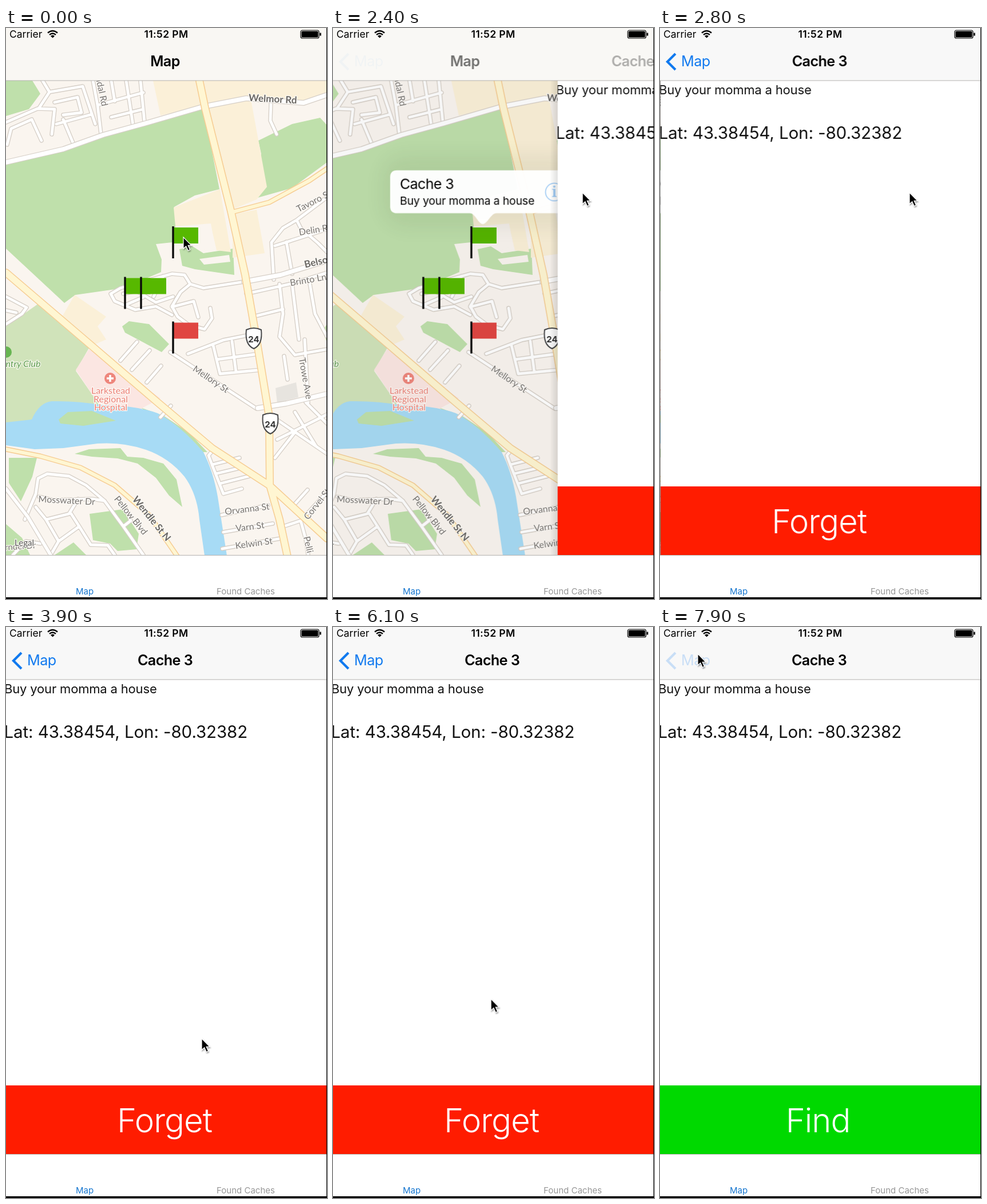
An HTML page for the animation above (8 s loop, 561x999 px).

```html
<!DOCTYPE html>
<html lang="en">
<head>
<meta charset="utf-8">
<title>Cache map</title>
<style>
html, body { margin: 0; width: 100%; height: 100%; overflow: hidden; background: #000; }
svg { display: block; width: 561px; height: 999px; font-family: Inter, Roboto, sans-serif; }
text { white-space: pre; }
.mid { text-anchor: middle; }

/* map */
.park { fill: #bfe0ab; }
.sand { fill: #fbf0d8; }
.water { fill: #a7dbf5; }
.land { fill: #faf5ef; }
.line { fill: none; stroke-linejoin: round; stroke-linecap: round; }
.case { stroke: #d6cfc7; }
.top { stroke: #fff; }
.hwcase { stroke: #f6cc92; }
.hwtop { stroke: #fff6d2; }
.label { font: 16px Lato, "Open Sans", sans-serif; fill: #777471; stroke: #fdfaf6; stroke-width: 2.5px; paint-order: stroke; text-anchor: middle; }
.main { font-weight: 700; fill: #6a6865; }
.poi { fill: #ec7f75; }
.club { fill: #579a48; font-style: italic; }

/* screens */
.title { font-size: 25.2px; font-weight: 600; letter-spacing: -.6px; }
.bar { font-size: 17.5px; }
.tab { font-size: 15px; }
.action { font-size: 58px; font-weight: 350; letter-spacing: -1px; fill: #fff; }

/* motion */
.slide, .fade, .anim, .leave, .enter { animation: 8s linear infinite; }
.slide { animation-name: slide; }
.fade { animation-name: fade; }
.leave { animation-name: slide, leave; }
.enter { animation-name: slide, fade; }
.hard { animation-timing-function: step-end; }
@keyframes slide {
  0%, 28.75% { transform: translateX(var(--from, 0px)); animation-timing-function: linear(0, .294, .785, .948, .989, .998, 1); }
  36.25%, 100% { transform: translateX(var(--to, 0px)); }
}
@keyframes fade {
  0%, 28.75% { opacity: 0; animation-timing-function: linear(0, .294, .785, .948, .989, .998, 1); }
  36.25%, 100% { opacity: var(--show, 1); }
}
@keyframes leave { 0%, 28.75% { opacity: 1; } 30% { opacity: .55; } 31.5%, 100% { opacity: 0; } }
@keyframes back {
  0%, 28.75% { opacity: 0; }
  30% { opacity: .03; }
  32.5% { opacity: .8; }
  35%, 96.25% { opacity: 1; }
  97.5%, 100% { opacity: .2; }
}
@keyframes pop {
  0%, 6.25% { opacity: 0; transform: scale(.3); }
  8.75% { opacity: 1; transform: scale(1.05); }
  10%, 100% { opacity: 1; transform: none; }
}
@keyframes press { 0%, 27.5% { opacity: 1; } 28.75%, 100% { opacity: .4; } }
@keyframes paint { 0% { fill: #ff1c00; } 86.25%, 100% { fill: #00d900; } }
@keyframes before { 0% { opacity: 1; } 86.25%, 100% { opacity: 0; } }
@keyframes after { 0% { opacity: 0; } 86.25%, 100% { opacity: 1; } }
@keyframes point {
  0%, 11.25% { transform: translate(310px, 366px); animation-timing-function: ease-in-out; }
  18.75%, 25% { transform: translate(430px, 292px); }
  27.5%, 45% { transform: translate(436px, 288px); }
  48.75%, 71.25% { transform: translate(342px, 720px); animation-timing-function: ease-in-out; }
  76.25% { transform: translate(276px, 650px); }
  80%, 91.25% { transform: translate(277px, 860px); animation-timing-function: ease-in-out; }
  96.25%, 100% { transform: translate(66px, 47px); }
}
#callout { animation-name: pop; transform-origin: 312px 343px; }
#info { animation-name: press; }
#back { animation-name: back; }
#button { animation-name: paint; }
#forget { animation-name: before; }
#find { animation-name: after; }
#cursor { animation-name: point; }
</style>
</head>
<body>
<svg viewBox="0 0 561 999" xmlns="http://www.w3.org/2000/svg">
<defs>
  <clipPath id="page"><rect y="92" width="560" height="831"/></clipPath>
  <clipPath id="screen"><rect width="560" height="996"/></clipPath>
  <filter id="soft" x="-30%" y="-60%" width="160%" height="220%"><feGaussianBlur stdDeviation="16"/></filter>
  <filter id="drop" x="-50%" y="-50%" width="200%" height="200%"><feDropShadow dx="1" dy="2" stdDeviation="1.2" flood-opacity=".4"/></filter>
  <linearGradient id="edge"><stop stop-opacity="0"/><stop offset="1" stop-opacity=".4"/></linearGradient>

  <path id="north" d="M0 165 55 141 85 142 80 186M2 204 9 176 45 160 62 197M64 92 76 112 57 141M76 112 134 102 150 150 156 168M85 130 125 121 132 148 100 152M88 168 150 151M118 203 100 160M152 92 160 135 166 185M184 92 190 128M210 92 222 170M235 92 242 164M160 135 240 113M184 156 236 143M463 132 462 162 473 186"/>
  <path id="east" d="M468 440 464 375 484 350 508 336 515 350 545 376 561 392M470 381 561 352M508 336 561 296M490 374 500 430M420 465 500 447 561 428M478 448 484 500 478 540 505 572 561 562M432 505 484 492M500 448 512 545M530 442 540 500 561 540M522 545 528 655M486 574 492 615"/>
  <path id="centre" d="M183 465 200 455 290 430 312 432 322 448 345 455 415 444M183 465 190 478 226 493 262 487 290 502M205 465 228 460 262 480 292 470M322 448 305 462 290 487 300 505 320 520 347 527 360 508 357 490M275 434 258 470M210 484 240 471M290 488 328 478 336 506M287 567 438 666M318 570 380 546 436 535M362 555 374 605 446 598M395 548 402 602M368 580 442 570M200 582 229 549M220 598 251 564M246 620 271 591M270 681 288 661"/>
  <path id="south" d="M474 720 561 676M476 687 561 745M505 672 542 732M524 655 561 692M470 752 506 706M362 738 354 748 360 764 408 752M360 764 380 815 412 806M366 780 412 769M374 797 425 784M377 852 458 835M380 882 466 867M378 911 480 893M500 838 527 808M485 872 515 862 561 812M515 862 524 895 528 922"/>
  <path id="west" d="M0 470 36 489 28 500 0 518M0 494 18 498M33 860 52 815 56 788 72 780 110 784 140 800 172 827 205 872 240 922M58 820 82 826 150 824 172 827M52 838 70 860 110 850 126 824M70 860 92 898 128 872 148 904M92 898 78 922M128 872 114 850M12 922 35 898 60 902M190 922 178 905 148 904M205 872 218 862 210 842"/>
  <path id="avenue" d="M0 235 100 212 170 187 250 165 343 138 420 123 520 131 561 117M416 444 480 432 561 407M440 665 490 657 561 640"/>
  <path id="creek" d="M0 806 38 855 78 922"/>
  <path id="highway" d="M338 92 348 140 393 320 418 432 437 540 460 680 461 800 478 860 492 925M0 428 145 552 265 655 360 735 460 800 561 893"/>
  <path id="byway" d="M0 737 60 749 130 769 190 800 250 852 300 925M396 322 460 305 530 267 561 246"/>
  <g id="streets" class="line">
    <use href="#north"/><use href="#east"/><use href="#centre"/><use href="#south"/><use href="#west"/>
  </g>
  <g id="flag">
    <rect x="2" y="2" width="43" height="28"/>
    <path d="M1 0V56" stroke="#0b0b0b" stroke-width="3.4"/>
  </g>
  <g id="shield">
    <path d="M-13-13Q0-19 13-13Q16 13 0 20Q-16 13-13-13Z" fill="#fff" stroke="#47484a" stroke-width="2"/>
    <text class="mid" y="9" font-size="15" font-weight="700" fill="#333">24</text>
  </g>
</defs>

<rect width="561" height="999"/>
<g clip-path="url(#screen)">
  <rect width="560" height="996" fill="#fff"/>
  <g clip-path="url(#page)">
    <g class="slide" style="--to:-168px">
      <rect class="land" y="92" width="561" height="831"/>
      <g class="park">
        <path d="M0 92H46L60 115 40 142 0 154ZM0 237 100 213 170 189 345 140 373 282 330 293 294 313 300 374 262 378 272 405 271 427 205 455 121 467 102 481 0 386Z"/>
        <path d="M436 298 446 220 441 197 500 168 549 157 561 170V235L500 280ZM303 387 326 382 345 394 397 386 399 432 330 422 308 416ZM203 522 215 513 250 518 285 553 272 567 240 550 208 533Z"/>
        <path d="M120 745 145 737 200 735 212 750 240 752 275 762 298 790 308 838 285 818 262 787 230 762 195 753 150 750ZM235 664 275 678 320 708 352 742 335 742 300 705ZM5 752 54 752 46 785 26 828 5 796ZM146 850 204 842 232 885 228 912 195 915 182 902 152 896ZM0 868 28 892 42 922H0ZM85 922 118 900 140 922ZM553 530 561 518V550Z"/>
      </g>
      <path d="M0 522 60 480 145 560 122 600 158 652 170 672 0 692Z" fill="#d0e3ba"/>
      <path class="sand" d="M257 92H332L344 136 270 153ZM340 92H561V117L520 131 428 125 456 278 438 300 394 318ZM293 314 374 282 393 392 368 389 358 345 296 347ZM396 326 438 318 452 394 396 402ZM98 505 120 467 175 505 160 522 175 545 145 558Z"/>
      <path class="land" d="M296 347 358 342 365 382 340 390 325 374 300 374ZM338 404 390 397 392 409 346 414Z"/>
      <path d="M145 562 185 588 270 648 225 672 160 655 122 598Z" fill="#fbe6e2"/>
      <path d="M471 630 507 620 511 646 474 656Z" fill="#e7e4df"/>
      <path class="water" d="M0 690 45 685Q58 655 80 653 125 652 170 660 225 660 265 674 305 695 345 742 362 775 370 820L386 923H347L338 860Q334 815 312 785 285 752 245 738 205 724 160 727L100 735 50 737 0 730Z"/>
      <path class="park" d="M92 685 108 672 150 670 192 687 135 696 95 692Z"/>

      <use href="#streets" class="case" stroke-width="7.5"/>
      <use href="#streets" class="top" stroke-width="4.8"/>
      <g class="line">
        <use href="#creek" class="case" stroke-width="8"/><use href="#creek" class="top" stroke-width="5.5"/>
        <use href="#avenue" class="case" stroke-width="10"/><use href="#avenue" class="top" stroke-width="7.5"/>
        <use href="#byway" class="hwcase" stroke-width="9"/><use href="#highway" class="hwcase" stroke-width="14"/>
        <use href="#byway" class="hwtop" stroke-width="6"/><use href="#highway" class="hwtop" stroke-width="11"/>
      </g>

      <g class="label">
        <text class="main" transform="translate(466 130) rotate(3)" font-size="17">Welmor Rd</text>
        <text transform="translate(162 112) rotate(78)">ndal Rd</text>
        <text transform="translate(538 309) rotate(-27)">Tavoro S</text>
        <text transform="translate(538 359) rotate(-9)">Delin R</text>
        <text class="main" transform="translate(543 415) rotate(-13)" font-size="17">Belso</text>
        <text transform="translate(529 446) rotate(-10)">Brinto Ln</text>
        <text transform="translate(355 619) rotate(34)">Mellory St</text>
        <text transform="translate(518 614) rotate(80)">Trowe Ave</text>
        <text transform="translate(106 832) rotate(3)">Mosswater Dr</text>
        <text transform="translate(214 856) rotate(51)">Pellow Blvd</text>
        <text class="main" transform="translate(250 862) rotate(51)" font-size="17">Wendle St N</text>
        <text transform="translate(422 847) rotate(-7)">Orvanna St</text>
        <text transform="translate(427 878) rotate(-7)">Varn St</text>
        <text transform="translate(434 907) rotate(-8)">Kelwin St</text>
        <text transform="translate(548 836) rotate(-52)">Corvel St</text>
        <text transform="translate(523 905) rotate(77)">Pelli</text>
        <text x="25" y="912" transform="rotate(-4 25 908)" font-size="15">rndel Dr</text>
        <text x="32" y="906" fill="#555" font-size="15">Legal</text>
        <text class="club" x="30" y="593">ntry Club</text>
        <g class="poi">
          <text x="183" y="640">Larkstead</text><text x="183" y="655">Regional</text><text x="183" y="669">Hospital</text>
        </g>
      </g>
      <circle cx="182" cy="613" r="10" fill="#ee867c"/>
      <path d="M176 613H188M182 607V619" stroke="#fff" stroke-width="3.5"/>
      <circle cy="567" r="10" fill="#67b552"/>
      <use href="#shield" x="433" y="541"/>
      <use href="#shield" x="462" y="690"/>

      <g fill="#57b800">
        <use href="#flag" x="291" y="347"/>
        <use href="#flag" x="207" y="435.5"/>
        <use href="#flag" x="235" y="435.5"/>
        <use href="#flag" x="291" y="513.5" fill="#e04642"/>
      </g>

      <rect class="fade" style="--show:.1" y="92" width="561" height="831"/>

      <g id="callout" class="anim">
        <rect x="136" y="222" width="352" height="128" rx="40" fill="#304020" opacity=".07" filter="url(#soft)"/>
        <path d="M162 249H462Q474 249 474 261V312Q474 324 462 324H336C326 324 320 343 312 343S299 324 289 324H162Q150 324 150 312V261Q150 249 162 249Z" fill="#fff" fill-opacity=".97"/>
        <text x="167" y="282" font-size="25" letter-spacing="-.6">Cache 3</text>
        <text x="167" y="309" font-size="19.5" letter-spacing="-.2">Buy your momma a house</text>
        <g id="info" class="anim" fill="#1580e8">
          <circle cx="437" cy="287" r="15.5" fill="none" stroke="#1580e8" stroke-width="1.7"/>
          <text class="mid" x="437" y="295.5" font-family="Noto Serif, serif" font-size="25" font-weight="700">i</text>
        </g>
      </g>
    </g>

    <g class="slide" style="--from:560px">
      <rect class="fade" x="-14" y="92" width="14" height="831" fill="url(#edge)"/>
      <g clip-path="url(#page)">
        <rect y="92" width="560" height="831" fill="#fff"/>
        <g fill="#111">
          <text x="-3" y="116" font-size="22" letter-spacing="-.17">Buy your momma a house</text>
          <text x="-3.5" y="194" font-size="29.5" letter-spacing="-.1">Lat: 43.38454, Lon: -80.32382</text>
        </g>
        <rect id="button" class="anim hard" y="802" width="560" height="121" fill="#ff1c00"/>
        <g class="action mid">
          <text id="forget" class="anim hard" x="277" y="884">Forget</text>
          <text id="find" class="anim hard" x="276" y="884">Find</text>
        </g>
      </g>
    </g>
  </g>

  <rect width="560" height="92" fill="#f9f7f3"/>
  <rect class="fade" width="560" height="92" fill="#f8f8f8"/>
  <path d="M0 92H560M0 922.5H560" stroke="#b4b2af"/>
  <g class="title mid">
    <text class="leave" style="--to:-159px" x="278" y="67">Map</text>
    <text class="enter" style="--from:366px" x="278" y="67">Cache 3</text>
  </g>
  <g id="back" class="anim">
    <path d="M27 45 13 59 27 73" fill="none" stroke="#1079ef" stroke-width="4.2"/>
    <text x="37" y="67" font-size="25.2" letter-spacing="-.6" fill="#1079ef">Map</text>
  </g>

  <g class="bar">
    <text x="6" y="17">Carrier</text>
    <text class="mid" x="280" y="17" font-weight="600" letter-spacing=".4">11:52 PM</text>
  </g>
  <g fill="none" stroke="#000" stroke-width="2.4">
    <path d="M73 8.5Q81.500 1.500 90 8.500M76 11.800Q81.500 7 87 11.800"/>
    <path d="M78 14 81.500 17.500 85 14Q81.500 11 78 14Z" fill="#000" stroke="none"/>
    <rect x="515" y="4" width="32" height="14" rx="3" stroke-width="1.2"/>
    <rect x="516.5" y="5.5" width="29" height="11" rx="1.5" fill="#000" stroke="none"/>
    <path d="M549.5 8.5V13.5"/>
  </g>

  <g class="tab mid">
    <text x="137.5" y="991" fill="#1676cf">Map</text>
    <text x="419" y="991" fill="#979797">Found Caches</text>
  </g>

  <g id="cursor" class="anim">
    <path d="M0 0V20L4.700 15.700 8.200 23.500 11.500 22 8.200 14.300H14Z" stroke="#fff" stroke-width="1.2" filter="url(#drop)"/>
  </g>
</g>
</svg>
</body>
</html>
```
